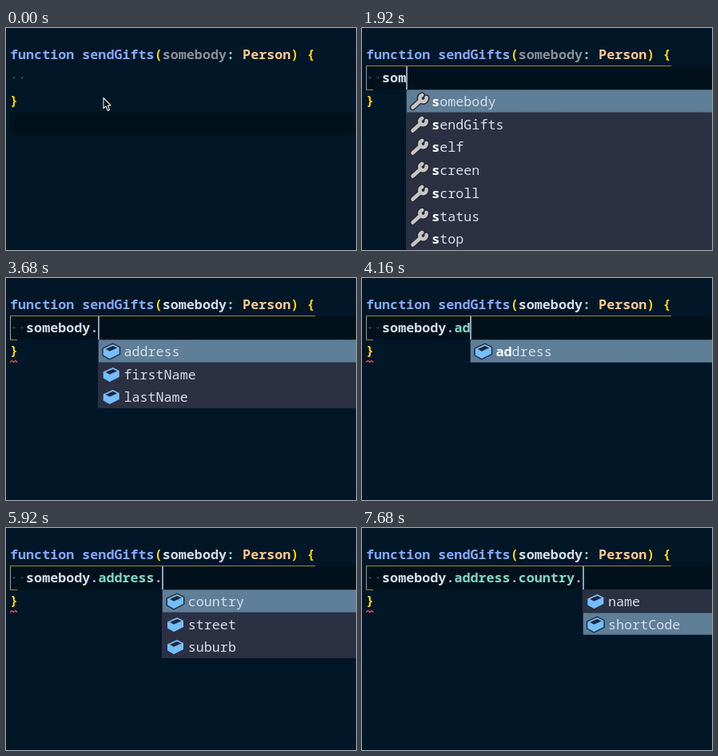
Recreate the animation shown at these times as an HTML page with a canvas. Size 438x278 px, loop 8 s.

```html
<!DOCTYPE html>
<html lang="en">
<head>
<meta charset="utf-8">
<title>Code completion</title>
<style>
  html, body { margin: 0; width: 100%; height: 100%; overflow: hidden; background: #011627; }
  canvas { display: block; width: 438px; height: 278px; }
</style>
</head>
<body>
<canvas id="stage"></canvas>
<script>
const W = 438, H = 278, LOOP = 8000, TICK = 160;
const LEFT = 5, FONT_SIZE = 16.73, CHAR = FONT_SIZE * 0.6, ROW = 28.7;
const COLOR = {
  bg: '#011627', activeLine: '#00111b', keyword: '#82aaff', bracket: '#ffd700',
  text: '#d6deeb', unused: '#87919a', punct: '#7fdbca', type: '#ffcb8b',
  dot: '#c792ea', guide: '#968a3e', guideSide: '#9a9c90', caret: '#80a4c2',
  space: '#34404c', popup: '#2c3043', selected: '#5f7e97', field: '#75beff',
  error: '#ef5350'
};

const canvas = document.getElementById('stage');
const ctx = canvas.getContext('2d');
const ratio = window.devicePixelRatio || 1;
canvas.width = W * ratio;
canvas.height = H * ratio;
ctx.lineJoin = 'round';

const words = ['somebody', 'sendGifts', 'self', 'screen', 'scroll', 'status', 'stop'];
const personFields = ['address', 'firstName', 'lastName'];
const addressFields = ['country', 'street', 'suburb'];
const countryFields = ['name', 'shortCode'];

// time, typed code, suggestions, matched letters, selected row
const steps = [
  [800, ''],
  [1760, 's'],
  [1920, 'som', words, 1],
  [2080, 'someb', ['somebody'], 4],
  [2240, 'somebod', ['somebody'], 6],
  [2400, 'somebody', ['somebody'], 8],
  [2720, 'somebody.', personFields],
  [4000, 'somebody.a', ['address'], 1],
  [4160, 'somebody.ad', ['address'], 2],
  [4320, 'somebody.add', ['address'], 3],
  [4480, 'somebody.address'],
  [4960, 'somebody.address.', addressFields],
  [6240, 'somebody.address.country'],
  [6560, 'somebody.address.country.'],
  [6720, 'somebody.address.country.', countryFields, 0, 1]
];

const within = (t, from, to) => t >= from && t < to;
const lerp = (a, b, k) => a + (b - a) * Math.min(1, Math.max(0, k));

function rect(x, y, w, h, color) {
  ctx.fillStyle = color;
  ctx.fillRect(x, y, w, h);
}

// Draws [text, color] spans one after another and returns the end position.
function write(x, y, spans, weight = 600) {
  ctx.font = `${weight} ${FONT_SIZE}px "Noto Sans Mono", monospace`;
  for (const [text, color] of spans) {
    ctx.fillStyle = color;
    ctx.fillText(text, x, y);
    x += text.length * CHAR;
  }
  return x;
}

function trace(points, close = true) {
  ctx.beginPath();
  points.forEach(([x, y]) => ctx.lineTo(x, y));
  if (close) ctx.closePath();
}

function stroke(color, width) {
  ctx.strokeStyle = color;
  ctx.lineWidth = width;
  ctx.stroke();
}

function fieldIcon(selected) {
  trace([[-10, -3.5], [2, -9], [10, -5], [10, 3], [-2, 9], [-10, 4.5]]);
  if (selected) stroke('#25303c', 3);
  ctx.fillStyle = COLOR.field;
  ctx.fill();
  trace([[-7, -3], [2, -7], [7.5, -4.5], [-2, -0.2]]);
  ctx.fillStyle = '#202838';
  ctx.fill();
}

function wrenchIcon() {
  ctx.lineCap = 'round';
  for (const [color, width] of [['#292b30', 7.5], ['#c5c5c5', 4.5]]) {
    trace([[-8, 7.5], [2, -1.5]], false);
    stroke(color, width);
    ctx.beginPath();
    ctx.arc(5, -4, 4.2, -0.25, Math.PI * 1.5 - 0.3);
    stroke(color, width);
  }
  ctx.lineCap = 'butt';
}

function drawSelection(x, top, bottom) {
  rect(x, top, W - x, bottom - top, COLOR.selected);
  ctx.setLineDash([1, 1]);
  for (const y of [top + 0.5, bottom - 0.5]) {
    trace([[x, y], [W, y]], false);
    stroke('#1d3c53', 1);
  }
  ctx.setLineDash([]);
}

function drawPopup(x, items, matched = 0, selected = 0) {
  const top = 77, left = Math.floor(x);
  const edge = row => Math.round(top + row * ROW);
  rect(left, top, W - left, edge(items.length) - top, COLOR.popup);
  drawSelection(left + 1, edge(selected), edge(selected + 1));
  items.forEach((item, i) => {
    const y = edge(i);
    ctx.save();
    ctx.translate(x + 16.3, y + 15);
    words.includes(item) ? wrenchIcon() : fieldIcon(i === selected);
    ctx.restore();
    const rest = write(x + 32, y + 21, [[item.slice(0, matched), '#ffffff']], 800);
    write(rest, y + 21, [[item.slice(matched), COLOR.text]], 500);
  });
}

function drawPointer(t) {
  if (t >= 1760) return;
  const approach = t / 800, leave = (t - 1120) / 320;
  const x = lerp(lerp(122, 46, approach), 70, leave);
  const y = lerp(lerp(87.5, 57, approach), 181, leave);
  ctx.save();
  ctx.translate(x, y);
  trace([[0, 0], [0, 13], [3, 10.4], [5.3, 16], [7.6, 15], [5.4, 9.8], [9, 9.4]]);
  ctx.fillStyle = '#0b0e12';
  ctx.fill();
  stroke('#f2f2f2', 1.1);
  ctx.restore();
}

function drawGuides() {
  rect(5, 47, 382, 1, COLOR.guide);
  rect(5, 48, 1, 29, COLOR.guideSide);
  rect(5, 77, 9, 1, COLOR.guide);
}

function drawSquiggle() {
  trace([[5, 105.5], [7.3, 103.5], [9.6, 105.5], [11.9, 103.5], [14.2, 105.5]], false);
  stroke(COLOR.error, 1.2);
}

function drawSpaces() {
  ctx.fillStyle = COLOR.space;
  for (const column of [0.5, 1.5]) {
    ctx.beginPath();
    ctx.arc(LEFT + column * CHAR, 62.3, 1.4, 0, Math.PI * 2);
    ctx.fill();
  }
}

function drawTyped(code) {
  const spans = code.split(/(\.)/).map((part, i) =>
    [part, part === '.' ? COLOR.dot : i ? COLOR.punct : COLOR.text]);
  return write(LEFT + 2 * CHAR, 68, spans);
}

function draw(t) {
  const step = steps.filter(([start]) => start <= t).pop();
  ctx.setTransform(ratio, 0, 0, ratio, 0, 0);
  rect(0, 0, W, H, COLOR.bg);
  rect(LEFT, step ? 48 : 106, W, step ? 29 : 28, COLOR.activeLine);

  write(LEFT, 39, [
    ['function sendGifts', COLOR.keyword], ['(', COLOR.bracket],
    ['somebody', t < 3040 ? COLOR.unused : COLOR.text], [': ', COLOR.punct],
    ['Person', COLOR.type], [') {', COLOR.bracket]
  ]);
  drawSpaces();
  write(LEFT, 96.5, [['}', COLOR.bracket]]);

  if (step) {
    const [start, code, items, matched, selected] = step;
    drawGuides();
    const end = drawTyped(code);
    if (within(t, 3040, 4960) || within(t, 5280, 6560) || t >= 7200) drawSquiggle();
    if (items) drawPopup(end, items, matched, selected);
    if ((t - start) % 960 < 480) rect(Math.floor(end), 48, 2, 29, COLOR.caret);
  }
  drawPointer(t);
}

function frame() {
  const t = performance.now() % LOOP;
  draw(Math.floor(t / TICK) * TICK);
  requestAnimationFrame(frame);
}
frame();
</script>
</body>
</html>
```
